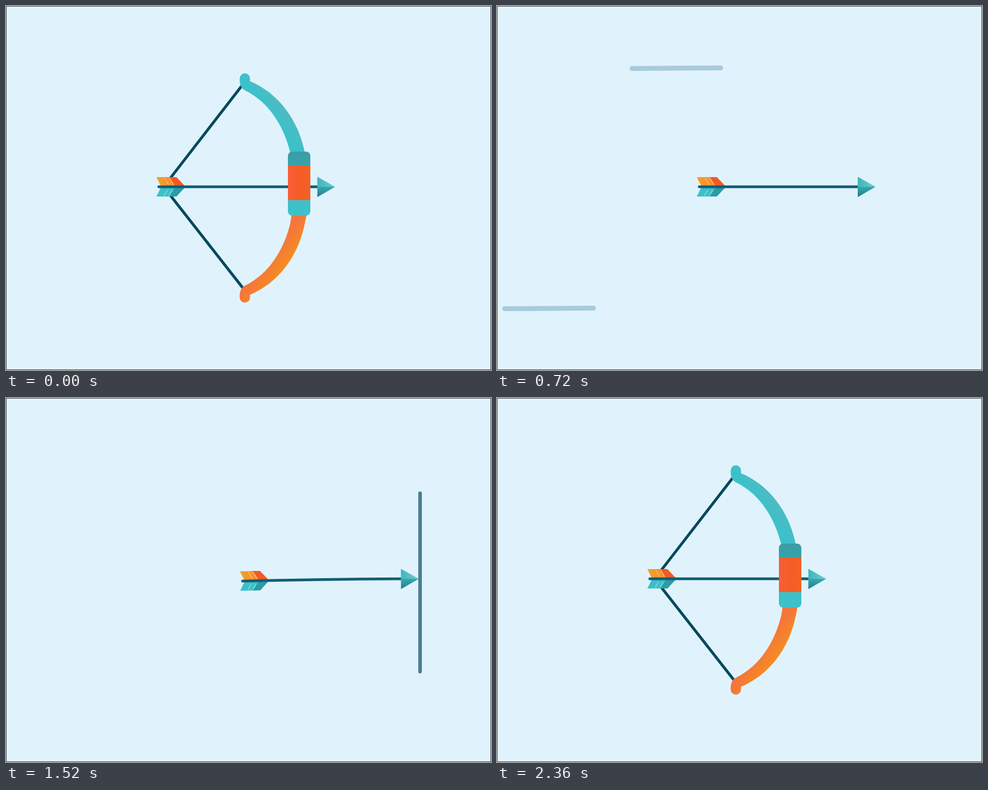
Write an HTML page that moves like this. It is 800 by 600 pixels and loops after 2400 ms.

```html
<!DOCTYPE html>
<html lang="en">
<head>
<meta charset="utf-8">
<title>Bow and arrow</title>
<style>
  html, body { margin: 0; width: 100%; height: 100%; overflow: hidden; background: #e0f3fd; }
  svg { display: block; width: 800px; height: 600px; }
  .line { fill: none; stroke-linecap: round; stroke-linejoin: round; }
</style>
</head>
<body>
<svg viewBox="0 0 800 600">
  <defs>
    <linearGradient id="limbTop" gradientUnits="userSpaceOnUse" x1="425" y1="195" x2="465" y2="165">
      <stop offset=".35" stop-color="#3cc1ca"/><stop offset="1" stop-color="#52b9c0"/>
    </linearGradient>
    <linearGradient id="limbLow" gradientUnits="userSpaceOnUse" x1="425" y1="195" x2="465" y2="165">
      <stop offset=".3" stop-color="#f4763a"/><stop offset=".8" stop-color="#f58a24"/>
    </linearGradient>
    <linearGradient id="grip">
      <stop offset="0" stop-color="#f65f38"/><stop offset=".5" stop-color="#f75c27"/><stop offset="1" stop-color="#f26124"/>
    </linearGradient>
    <linearGradient id="cuff" x2="0" y2="1">
      <stop offset="0" stop-color="#3c9da4"/><stop offset="1" stop-color="#36a3aa"/>
    </linearGradient>
    <linearGradient id="warm">
      <stop offset="0" stop-color="#f6a02c"/><stop offset="1" stop-color="#f3822a"/>
    </linearGradient>
    <linearGradient id="tipTop">
      <stop offset="0" stop-color="#3db6bd"/><stop offset="1" stop-color="#74cbcb"/>
    </linearGradient>
    <linearGradient id="tipLow" x2="0" y2="1">
      <stop offset="0" stop-color="#36abb2"/><stop offset="1" stop-color="#247b85"/>
    </linearGradient>
    <path id="limb" d="M385.5 119.500a8.500 8.500 0 0 1 17 0V124C448 143 482 186 493 242L497 262H472L469 242C458 196 432 158 396 140C389 137 385.500 131 385.500 123Z"/>
    <clipPath id="gripShape"><rect x="465" y="240" width="37" height="105.500" rx="7"/></clipPath>
  </defs>

  <rect width="800" height="600" fill="#e0f3fd"/>
  <rect x=".5" y=".5" width="799" height="599" fill="none" stroke="#545c60"/>

  <g id="streaks" class="line" stroke="#a8cadc" stroke-width="8">
    <path d="M516 103L662 102M306 499L452 498"/>
  </g>
  <path id="wall" class="line" stroke="#4b7e93" stroke-width="6"/>
  <path id="sparks" class="line" stroke="#6f9fb5" stroke-width="4"/>
  <path id="string" class="line" stroke="#04485c" stroke-width="4.5"/>

  <g id="arrow">
    <g id="feathers">
      <path d="M-295-16H-262L-247 0H-287Z" fill="url(#warm)"/>
      <path d="M-274-16H-262L-247 0H-263Z" fill="#f05a26"/>
      <path d="M-295 16H-262L-247 0H-287Z" fill="#3cc0c8"/>
      <path d="M-274 16H-262L-247 0H-263Z" fill="#2a9da6"/>
      <path class="line" stroke="#fbc27a" stroke-width="1.3" d="M-281-14L-275-4M-273-14L-267-4"/>
      <path class="line" stroke="#8fdde0" stroke-width="1.3" d="M-282 14L-277 6M-274 14L-269 6"/>
    </g>
    <path id="shaft" class="line" stroke="#135e74" stroke-width="4.5"/>
    <g id="tip">
      <path d="M-29.500-16.500L0 0H-29.500Z" fill="url(#tipTop)"/>
      <path d="M-29.500 17L0 0H-29.500Z" fill="url(#tipLow)"/>
    </g>
  </g>

  <g id="bow">
    <use href="#limb" fill="url(#limbTop)"/>
    <use href="#limb" fill="url(#limbLow)" transform="matrix(1 0 0 -1 0 600)"/>
    <g clip-path="url(#gripShape)">
      <rect x="465" y="240" width="37" height="24" fill="url(#cuff)"/>
      <rect x="465" y="263" width="37" height="58" fill="url(#grip)"/>
      <rect x="465" y="320" width="37" height="26" fill="#3ec1c9"/>
    </g>
  </g>
</svg>
<script>
const LOOP = 2400, STEP = 40, AXIS = 298;
const $ = id => document.getElementById(id);
const set = (id, name, value) => $(id).setAttribute(name, value);
const show = (id, on) => set(id, 'visibility', on ? 'visible' : 'hidden');
const move = (id, x, y) => set(id, 'transform', `translate(${x} ${y})`);

const ramp = (t, a, b) => Math.min(1, Math.max(0, (t - a) / (b - a)));
const mix = (a, b, p) => a + (b - a) * p;
const inOut = p => p < .5 ? 4 * p ** 3 : 1 - 4 * (1 - p) ** 3;
const out = p => 1 - (1 - p) ** 2;
const sine = p => (1 - Math.cos(Math.PI * p)) / 2;
const linear = p => p;

// Value at time t in a list of [time, value] keys.
function track(keys, t, ease = linear) {
  const i = keys.findIndex(k => k[0] > t);
  if (i < 0) return keys[keys.length - 1][1];
  if (i === 0) return keys[0][1];
  const [a, b] = [keys[i - 1], keys[i]];
  return mix(a[1], b[1], ease(ramp(t, a[0], b[0])));
}

const WALL_X = [[880, 812], [920, 781], [960, 750], [1000, 717], [1040, 683]];
const WOBBLE = [[1040, 0], [1200, 50], [1430, -22], [1580, 6], [1680, 0]];

function drawArrow(t, pull) {
  const fly = ramp(t, 316, 1000);
  move('arrow', 543 + 138 * fly * (1 - pull), AXIS);

  // The shaft bends as a parabola fixed at the tip.
  const len = 291, lift = track(WOBBLE, t, sine);
  const rise = u => lift * (.25 * u + .75 * u * u);
  const slope = u => lift * (.25 + 1.5 * u);
  const turn = u => Math.atan(slope(u) / len) * 180 / Math.PI;
  const end = .09, mid = (1 + end) / 2;
  const bend = rise(end) + slope(end) * (mid - end);
  const tailX = -len + Math.abs(lift) * .06;
  set('shaft', 'd', `M${tailX} ${-rise(1)}Q${-len * mid} ${-bend} ${-len * end} ${-rise(end)}`);
  set('feathers', 'transform',
    `translate(0 ${-rise(270 / len)}) rotate(${turn(270 / len)} -270 0)`);
  set('tip', 'transform', `rotate(${turn(.05)})`);
}

function drawBow(t, pull) {
  const leaving = t < 1000;
  const x = leaving ? -540 * (t / 360) ** 2 : 0;
  const y = leaving ? 0 : 500 * (1 - inOut(ramp(t, 1720, 2220)));
  const visible = x > -510 && y < 495;
  show('bow', visible);
  show('string', visible);
  move('bow', x, y);
  move('string', x, y);
  // On release the string stays at the nock until it is straight.
  const nock = leaving ? Math.min(397, 260 - x) : mix(397, 260, pull);
  set('string', 'd', `M394 125L${nock} ${AXIS}L394 469`);
}

function drawWall(t) {
  const x = track(WALL_X, t);
  const top = mix(157, 503, inOut(ramp(t, 1720, 2285)));
  const low = mix(451, 503, inOut(ramp(t, 1720, 2240)));
  show('wall', t >= 920 && t < 2280);
  set('wall', 'd', `M${x} ${top}V${low}`);
}

function drawSparks(t) {
  const head = 35 * out(ramp(t, 1060, 1240));
  const tail = 35 * ramp(t, 1140, 1400);
  show('sparks', t > 1060 && t < 1400 && head > tail);
  const ray = (x, y, dir) =>
    `M${x - tail} ${y + dir * tail}L${x - head} ${y + dir * head}`;
  set('sparks', 'd', ray(649, 279, -1) + ray(650, 315, 1));
}

function draw(t) {
  const pull = inOut(ramp(t, 2040, 2350));
  move('streaks', -1.466 * (t - 520), 0);
  show('streaks', t < 1040);
  drawWall(t);
  drawSparks(t);
  drawArrow(t, pull);
  drawBow(t, pull);
}

const start = performance.now();
function tick() {
  const t = (performance.now() - start) % LOOP;
  draw(Math.floor(t / STEP) * STEP);
  requestAnimationFrame(tick);
}
tick();
</script>
</body>
</html>
```
